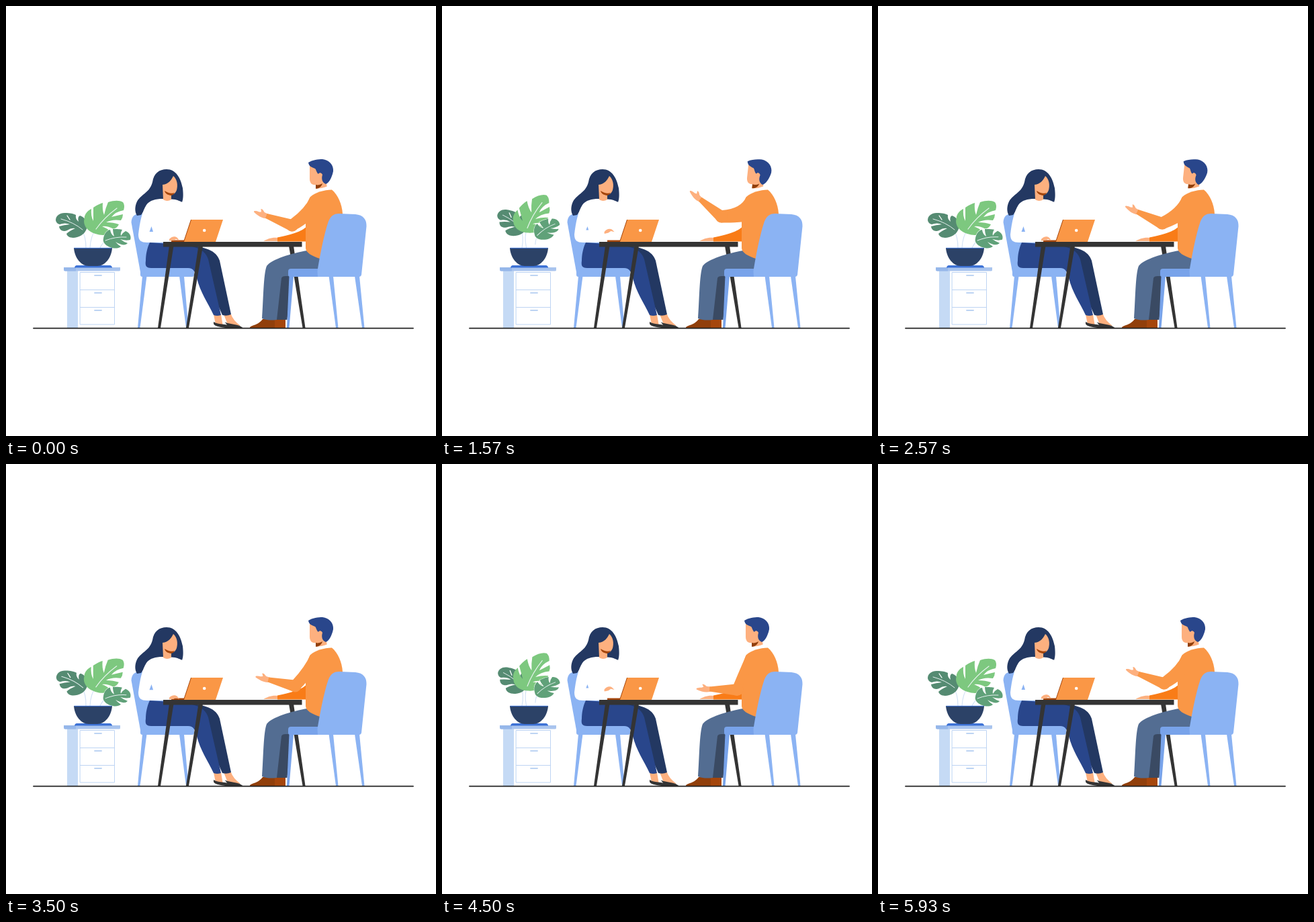
These frames come from a looping animation (640 px wide and 640 px high, 6070 ms). An HTML page with a canvas:

```html
<!DOCTYPE html>
<html lang="en">
<head>
<meta charset="utf-8">
<title>Meeting at a table</title>
<style>
  html, body { margin: 0; width: 100%; height: 100%; overflow: hidden; background: #fff; }
  canvas { display: block; width: 640px; height: 640px; }
</style>
</head>
<body>
<canvas id="stage" width="640" height="640"></canvas>
<script>
const ctx = document.getElementById('stage').getContext('2d');
const LOOP = 6070, STEP = 71.41;
const RAD = Math.PI / 180;

const SKIN = '#fdb07f', NAVY = '#233862', ROYAL = '#29468b', BLACK = '#343434';
const SKY = '#8bb3f3', SKY_DARK = '#78a3ea', PALE = '#c5daf5', LINE = '#bdd4f3';
const ORANGE = '#fa9746', ORANGE_DARK = '#f97c17', BROWN = '#913f0b', RUST = '#a5460c';

// Keyframes [time, value], joined by curves that flatten at the turning points.
const ARM = [[290, 0], [1070, .52], [1570, 1], [2570, .25], [3500, -.36], [4500, -1], [5930, 0]];
const HEAD = [[500, 0], [1070, .42], [1570, 1], [2570, 1], [3500, 0]];
const LEAF_LEFT = [[300, 0], [1320, 1], [2450, 0], [3300, 0], [4380, 1], [5450, 0]];
const LEAF_BIG = [[430, 0], [1600, 1], [2570, 0], [3400, 0], [4600, 1], [5600, 0]];
const LEAF_RIGHT = [[450, 0], [1640, 1], [2620, 0], [3420, 0], [4640, 1], [5650, 0]];
const TYPING = [[380, 0], [1450, 1], [2570, 0], [3400, -.1], [4480, 1], [5600, 0]];

function track(keys, t) {
  const last = keys.length - 1;
  if (t <= keys[0][0]) return keys[0][1];
  if (t >= keys[last][0]) return keys[last][1];
  const rate = i => (keys[i + 1][1] - keys[i][1]) / (keys[i + 1][0] - keys[i][0]);
  const slope = i => {
    if (i === 0 || i === last) return 0;
    const a = rate(i - 1), b = rate(i);
    return a * b <= 0 ? 0 : 2 * a * b / (a + b);
  };
  let i = 0;
  while (t > keys[i + 1][0]) i++;
  const [t0, v0] = keys[i], [t1, v1] = keys[i + 1];
  const d = t1 - t0, u = (t - t0) / d, w = 1 - u;
  return v0 * w * w * (1 + 2 * u) + v1 * u * u * (3 - 2 * u)
    + d * u * w * (slope(i) * w - slope(i + 1) * u);
}

function fill(color, path) {
  ctx.fillStyle = color;
  ctx.fill(new Path2D(path));
}

function stroke(color, width, path) {
  ctx.strokeStyle = color;
  ctx.lineWidth = width;
  ctx.lineCap = 'round';
  ctx.stroke(new Path2D(path));
}

function rotated(x, y, degrees, draw) {
  ctx.save();
  ctx.translate(x, y);
  ctx.rotate(degrees * RAD);
  ctx.translate(-x, -y);
  draw();
  ctx.restore();
}

// Straight leg tapering from the top edge to the floor.
function leg(color, x0, x1, top, x2, x3) {
  fill(color, `M${x0} ${top}H${x1}L${x3} 479H${x2}Z`);
}

function drawCabinet() {
  fill(PALE, 'M91 394H107V479H91Z');
  stroke(LINE, 1, 'M110.5 396.5H161.5V474H110.5ZM110.5 422.5H161.5M110.5 448.5H161.5');
  stroke(LINE, 1.8, 'M132 401H142M132 427H142M132 453H142');
  fill('#a9c4ee', 'M86 389H170V393Q170 394.5 168 394.5H88Q86 394.5 86 392Z');
  fill('#96b7ea', 'M86 389H104V394.5H88Q86 394.5 86 392Z');
}

function drawPlant(t) {
  rotated(118, 360, 12 * track(LEAF_LEFT, t), () => {
    stroke('#d3e2f5', 1.2, 'M119 360Q119 342 112 332');
    fill('#558b72', `M121 327C120 320 117 314 110 312Q106 314 108 321Q103 317 104 311
      C98 308 92 308 87 308C80 308 74 312 74 319Q75 324 80 325Q88 322 95 325Q86 326 79 328
      C80 335 86 336 91 334Q97 330 103 331Q94 335 90 339C92 345 99 346 106 344
      C114 342 120 336 121 327Z`);
    stroke('#e4efee', 1, 'M82 317Q101 322 114 333');
    stroke('#fff', 1.3, 'M91 312L95 318');
  });
  rotated(125, 358, -15 * track(LEAF_BIG, t), () => {
    stroke('#d3e2f5', 1.2, 'M125 360Q126 342 134 332');
    fill('#7dc87f', `M117 313C119 307 123 304 127 302Q126 313 130 320Q130 309 130 300
      C136 296 140 294 144 293Q143 304 146 311Q148 301 152 292C161 289 169 289 174 292
      C177 296 176 301 175 304Q163 306 157 314Q165 312 174 310Q174 315 171 319
      Q158 317 149 322Q160 322 168 325C166 329 163 331 160 332Q151 327 143 328Q151 331 156 336
      C152 342 142 342 133 339C123 336 116 329 116 320Z`);
    stroke('#e5f2ec', 1.2, 'M165 301Q146 315 134 332');
  });
  rotated(127, 360, -24 * track(LEAF_RIGHT, t), () => {
    stroke('#d3e2f5', 1.2, 'M140 360Q144 351 153 347');
    const leaf = `M145 346C146 339 150 334 155 333Q156 340 161 343Q159 337 159 332
      C166 332 170 332 173 333Q170 338 171 342Q174 337 178 335C184 337 187 343 185 348
      Q178 350 170 347Q175 351 181 353C178 357 171 356 163 351Q166 355 171 358
      C165 363 154 360 148 355C145 352 144 349 145 346Z`;
    stroke('#fff', 1.2, leaf);
    fill('#60a179', leaf);
    stroke('#e4efee', 1, 'M179 344Q163 343 148 349');
  });
  fill('#3d72d6', 'M105 386H155Q158 387 158 389.5H102Q102 387 105 386Z');
  fill('#2c4267', 'M101 360H158C157 375 147 387 136 387H123C112 387 102 375 101 360Z');
  stroke('#3d72d6', 1, 'M102 360.3H157');
}

function drawLeftChair() {
  fill(SKY, 'M186.5 322C187 313 191 309 201 309H220L250 396H200Z');
  leg(SKY, 203, 209.5, 402, 196, 199.5);
  leg(SKY, 258, 265, 402, 268, 271.5);
  fill(SKY, 'M200 390H277Q280 390 280 394V400Q280 403 277 403H203Q200 403 200 400Z');
}

function drawWoman(t) {
  const lift = track(TYPING, t);
  fill(NAVY, `M218 262C220 249 228 243 239 243C253 243 260 256 263 271C264 280 264 287 262 292
    C250 287 240 286 230 290L213 294L201 311L195 312C191 306 192 297 195 291C202 279 214 278 218 262Z`);
  fill('#fff', `M233 287C223 287 214 289 209 296C203 305 199 321 197 340C197 349 201 352 210 352
    H262V292C255 288 249 287 246 288Z`);
  fill(SKIN, `M233 266C242 265 246 259 249 253C255 258 256 267 254 274C252 279 249 281 246 281
    V288C242 291 236 290 234 288Z`);
  fill(RUST, 'M236 275C241 278 246 280 251 278C249 281 247 282 245 282C240 281 237 279 236 275Z');
  fill(SKY, `M216.5 328L${219 - .8 * lift} ${336 - 2.5 * lift}H${213.5 + .8 * lift}Z`);

  fill(SKIN, 'M309 459H320L323 477L312 474ZM324 459H335Q338 468 349 476L330 474Z');
  fill(BLACK, 'M309 470C314 474 326 473 340 477V479.5H332C323 479 310 477 309 473Z');
  fill(BLACK, 'M326 470.5C333 474 347 473 353 479.5H339C333 478 328 475 326 470.5Z');
  fill(NAVY, 'M262 355C298 358 313 364 318 379L335 459Q329 462 322 460L285 376Z');
  fill(ROYAL, `M214 352L258 355C288 358 297 365 301 377L320 460Q314 462 309 460
    C300 441 289 426 284 405C282 396 279 390 271 390H216C208 390 207 386 208 379C208 370 210 360 214 352Z`);
}

function drawTable() {
  leg(BLACK, 243, 249.5, 357, 226, 230);
  leg(BLACK, 286.5, 293, 357, 268, 272);
  fill(BLACK, 'M234 351H440.5V358.5H234Z');
}

function drawLaptop(t) {
  fill(RUST, 'M246 348.5H268V351H246Z');
  const lift = track(TYPING, t);
  rotated(250, 347, -8 * lift, () => {
    ctx.translate(0, -12 * lift);
    fill(SKIN, 'M243 347C246 343 252 342 255 345L258 349L253 347L249 349L243 349.5Z');
  });
  fill(RUST, 'M275 318H278L267 351H264Z');
  fill(ORANGE, 'M276 318H323L312 351H265Z');
  ctx.fillStyle = '#fff';
  ctx.beginPath();
  ctx.arc(295.2, 334, 2.3, 0, 7);
  ctx.fill();
}

function drawManLegs() {
  leg(BLACK, 421, 428, 357, 441.5, 445.5);
  fill(BROWN, 'M363 479C363 475 375 476 382 466H402V479Z');
  fill(RUST, 'M400 466H416V479H400Z');
  fill('#3a4a63', 'M406 402H425L418.5 467H400Z');
  fill('#536d92', `M448 364C425 368 395 377 388 387C383 399 383 440 381 465C388 468 396 468 403 467
    L410 405Q411 402 416 402H468V376Z`);
}

function drawHead(t) {
  rotated(468, 275, 6.3 * track(HEAD, t), () => {
    fill(SKIN, `M452 237V257C452 264 456 267 461 266V272L478 270L476 260L472 250L462 240Z`);
    fill(BROWN, 'M461 266C464 267 468 266 471 264C470 269 465 272 461 272Z');
    fill(ROYAL, `M450 233C456 229 465 228 471 228C481 229 488 237 487 246C485 256 480 264 476 265
      C471 263 469 258 471 251C469 247 466 248 465 250C462 248 462 244 460 242C455 240 451 239 450 233Z`);
  });
}

function drawFrontArm(t) {
  const pose = track(ARM, t);
  const upper = (134 + 18 * pose) * RAD, fore = (200 + 19 * pose) * RAD;
  const elbow = [462 + 52 * Math.cos(upper), 289 + 52 * Math.sin(upper)];
  const wrist = [elbow[0] + 41 * Math.cos(fore), elbow[1] + 41 * Math.sin(fore)];
  const beside = ([x, y], angle, d) => [x - d * Math.sin(angle), y + d * Math.cos(angle)];
  const bend = (upper + fore) / 2;

  ctx.save();
  ctx.translate(...wrist);
  ctx.rotate(fore);
  fill(SKIN, 'M-2 -3.5C5 -6 12 -4 19 -1C21 1 17 2 12 2L9 3L11 7C8 8 6 5 4 4L-2 3.5Z');
  ctx.restore();

  // Sleeve: cuff, inner elbow, shoulder, armpit, outer elbow.
  ctx.fillStyle = ORANGE;
  ctx.beginPath();
  ctx.moveTo(...beside(wrist, fore, 3.6));
  ctx.lineTo(...beside(elbow, bend, 9.5));
  ctx.quadraticCurveTo(445, 302, 453, 284);
  ctx.lineTo(468, 300);
  ctx.lineTo(450, 321);
  ctx.quadraticCurveTo(...beside(elbow, bend, -11), ...beside(elbow, fore, -9));
  ctx.lineTo(...beside(wrist, fore, -3.6));
  ctx.fill();
  ctx.beginPath();
  ctx.arc(...elbow, 9.3, 0, 7);
  ctx.fill();
}

function drawMan(t) {
  fill(SKIN, 'M383 350C389 347 395 344 405 345V350Z');
  fill(ORANGE_DARK, 'M450 326C441 335 431 339 404 344.5V350.5H450Z');
  drawHead(t);
  fill('#fff', 'M457 280C461 272 473 271 479 268L486 275L460 286Z');
  fill(ORANGE, `M453 284C461 277 473 274 485 273.5C494 281 500 295 501 309L490 376H467
    C455 372 446 367 446 360V320C447 302 449 291 453 284Z`);
  drawFrontArm(t);
}

function drawRightChair() {
  leg(SKY_DARK, 421.5, 428, 402, 418, 421.5);
  leg(SKY, 480.5, 487, 402, 491, 494.5);
  leg(SKY, 519, 526, 402, 530, 533.5);
  fill(SKY_DARK, 'M424 391H470V403H423Q420 403 420 400V395Q420 391 424 391Z');
  fill(SKY, `M464 403L463.5 395C467 372 473 342 478.5 325C482 313 487 309 496 309L520 310
    C532 311 537 318 536.5 328L529 400Q528.5 403 525 403Z`);
}

function render(t) {
  ctx.fillStyle = '#fff';
  ctx.fillRect(0, 0, 640, 640);
  drawCabinet();
  drawPlant(t);
  drawLeftChair();
  drawWoman(t);
  drawManLegs();
  drawTable();
  drawLaptop(t);
  drawMan(t);
  drawRightChair();
  stroke('#222', 1.9, 'M41 479.6H606');
}

const start = performance.now();
function tick() {
  const t = (performance.now() - start) % LOOP;
  render(Math.floor(t / STEP + .05) * STEP);
  requestAnimationFrame(tick);
}
tick();
</script>
</body>
</html>
```
